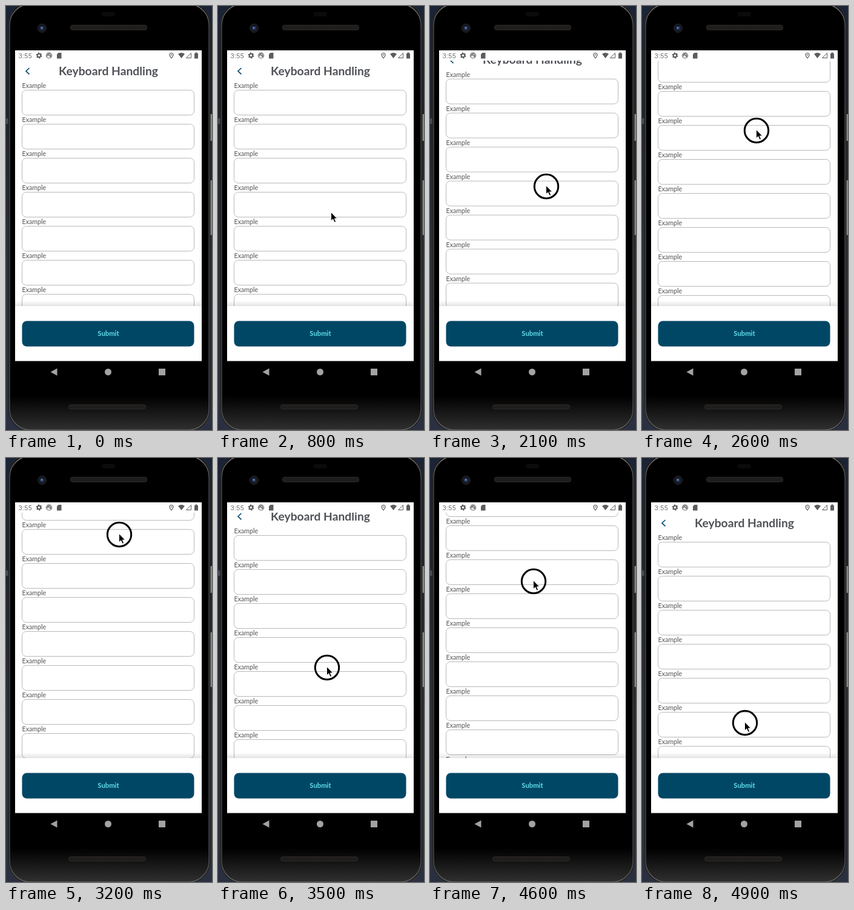
An HTML page that plays this animation: 340 by 698 pixels, repeating every 5000 ms.

```html
<!DOCTYPE html>
<html lang="en">
<head>
<meta charset="utf-8">
<title>Keyboard Handling</title>
<style>
html, body { margin: 0; width: 100%; height: 100%; overflow: hidden; background: #1b1e26; }
svg { display: block; width: 340px; height: 698px; }
text { font-family: Lato, sans-serif; }
</style>
</head>
<body>
<svg viewBox="0 0 340 698">
  <defs>
    <linearGradient id="back" x2="0" y2="1">
      <stop stop-color="#1a2436"/><stop offset=".25" stop-color="#1d222c"/>
      <stop offset=".6" stop-color="#2b2f38"/><stop offset="1" stop-color="#2a3040"/>
    </linearGradient>
    <linearGradient id="rim" x2="0" y2="1">
      <stop stop-color="#777"/><stop offset=".06" stop-color="#484848"/>
      <stop offset=".94" stop-color="#484848"/><stop offset="1" stop-color="#666"/>
    </linearGradient>
    <linearGradient id="glass" x2="0" y2="1">
      <stop offset=".92" stop-color="#000"/><stop offset="1" stop-color="#303030"/>
    </linearGradient>
    <linearGradient id="shade" x2="0" y2="1">
      <stop stop-color="#000" stop-opacity="0"/><stop offset="1" stop-color="#000" stop-opacity=".11"/>
    </linearGradient>
    <pattern id="mesh" width="3" height="3" patternUnits="userSpaceOnUse">
      <rect width="3" height="3" fill="#242220"/><path d="M0 3L3 0" stroke="#171514"/>
    </pattern>
    <clipPath id="view"><rect x="15" y="90" width="308" height="404"/></clipPath>
  </defs>

  <!-- phone -->
  <rect width="340" height="698" fill="url(#back)"/>
  <path d="M336 178h4v44h-4zM336 287h4v90h-4z" fill="#85878b"/>
  <path d="M0 185h4v9H0z" fill="#454b58"/>
  <rect x="4" y="-6" width="333" height="706" rx="36" fill="#121212" stroke="#2c2c2c"/>
  <rect x="6" y="-3" width="329" height="701" rx="34" fill="url(#glass)" stroke="url(#rim)" stroke-width="1.500"/>
  <rect x="158" y="10" width="22" height="7" rx="3" fill="#0b0b0e"/>
  <circle cx="59.500" cy="36.500" r="7" fill="#14171e" stroke="#24272d"/>
  <circle cx="59.500" cy="36.500" r="3.500" fill="#213458"/>
  <circle cx="59" cy="36" r="1.300" fill="#7d97c8"/>
  <g fill="url(#mesh)" stroke="#2c2a28">
    <rect x="106.500" y="31.500" width="126" height="8" rx="3"/>
    <rect x="103.500" y="656.500" width="127" height="7" rx="3"/>
  </g>
  <g fill="#a3a3a3">
    <path d="M84.500 596.500v12l-11-6z"/>
    <circle cx="168.500" cy="602.500" r="5.500"/>
    <path d="M252 597h11v11h-11z"/>
  </g>
  <rect x="15" y="73" width="308" height="511.500" fill="#fff"/>

  <!-- status bar -->
  <g fill="#5c5c5c">
    <text x="20.500" y="86" font-size="11.500" fill="#757575" style="font-family:Roboto,sans-serif">3:55</text>
    <circle cx="54.500" cy="81.500" r="2.700" fill="none" stroke="#5c5c5c" stroke-width="2"/>
    <circle cx="54.500" cy="81.500" r="4.200" fill="none" stroke="#5c5c5c" stroke-width="1.500" stroke-dasharray="2.200"/>
    <circle cx="71" cy="81.500" r="4.500" fill="none" stroke="#5c5c5c" stroke-width="1.200"/>
    <path d="M68.500 83v-2a2.500 2.500 0 0 1 5 0v2M69 79l5 5" fill="none" stroke="#5c5c5c" stroke-width="1.200"/>
    <path d="M86.500 77H91.500v9.500h-7.500v-7z"/>
    <path d="M273 86c-2-2.500-3-4-3-5.500a3 3 0 0 1 6 0c0 1.500-1 3-3 5.500z" fill="none" stroke="#5c5c5c" stroke-width="1.200"/>
    <circle cx="273" cy="80.500" r="1"/>
    <path d="M284 79q5.500-4 11 0l-5.500 7z"/>
    <path d="M305.500 77.500V85.500h-8z" fill="none" stroke="#5c5c5c"/>
    <path d="M311 78h1.500v-1.500h3V78h1.500v8.500h-6z"/>
  </g>

  <!-- form -->
  <g clip-path="url(#view)"><g id="page">
    <path d="M38.500 102l-5.500 5.200 5.500 5.200" fill="none" stroke="#0b4f73" stroke-width="1.700"/>
    <text x="169" y="113.500" font-size="19.300" font-weight="700" text-anchor="middle" fill="#4f5257">Keyboard Handling</text>
  </g></g>
  <rect x="15" y="485" width="308" height="9" fill="url(#shade)"/>
  <rect x="26.500" y="518.500" width="284" height="42" rx="8" fill="#004765"/>
  <text x="169" y="543" font-size="11.300" font-weight="700" text-anchor="middle" fill="#62dcea">Submit</text>

  <!-- pointer -->
  <g id="pointer">
    <circle id="ring" cy="1" r="19.700" fill="none" stroke="#000" stroke-width="3"/>
    <path transform="translate(-.5 -.5) scale(.92)" d="M0 0V15.500L3.600 12.200 6.200 18.200 8.800 17 6.300 11.300H11z" fill="#000" stroke="#fff"/>
  </g>
</svg>
<script>
const $ = id => document.getElementById(id);
const LOOP = 5000, STEP = 100, PITCH = 56;

let fields = '';
for (let i = 0; i < 14; i++) {
  const y = 131 + i * PITCH;
  fields += `<text x="26.5" y="${y + 4}" font-size="10.7" fill="#555">Example</text>
    <rect x="26.5" y="${y + 7.5}" width="284" height="41" rx="7" fill="#fff" stroke="#b9b9b9"/>`;
}
$('page').innerHTML += fields;

// rows of [time, values...]
const path = [
  [200, 205, 523], [700, 185, 368], [1200, 197, 228], [1500, 197, 228],
  [1900, 193, 314], [2000, 192, 314], [2600, 189, 204], [3200, 187, 125],
  [3500, 180, 344], [3600, 179, 371], [4200, 173, 207], [4500, 171, 124], [4900, 170, 435]
];
const scroll = [
  [2000, 0], [2600, 110], [3200, 189], [3300, 135], [3500, 11], [3600, 0],
  [4200, 164.5], [4500, 247], [4600, 195], [4800, 17], [4900, 0]
];

function at(keys, t) {
  const next = keys.findIndex(k => k[0] > t);
  if (next === 0) return keys[0].slice(1);
  if (next < 0) return keys[keys.length - 1].slice(1);
  const a = keys[next - 1], b = keys[next], u = (t - a[0]) / (b[0] - a[0]);
  return a.slice(1).map((v, i) => v + (b[i + 1] - v) * u);
}

function draw(now) {
  const t = Math.floor(now % LOOP / STEP) * STEP;
  const [x, y] = at(path, t).map(Math.round);
  $('page').setAttribute('transform', `translate(0 ${-at(scroll, t)[0]})`);
  $('pointer').setAttribute('transform', `translate(${x} ${y})`);
  $('pointer').style.display = t < 200 ? 'none' : '';
  $('ring').style.display = t < 2000 ? 'none' : '';
}

const start = performance.now();
function tick() {
  draw(performance.now() - start);
  requestAnimationFrame(tick);
}
tick();
</script>
</body>
</html>
```
